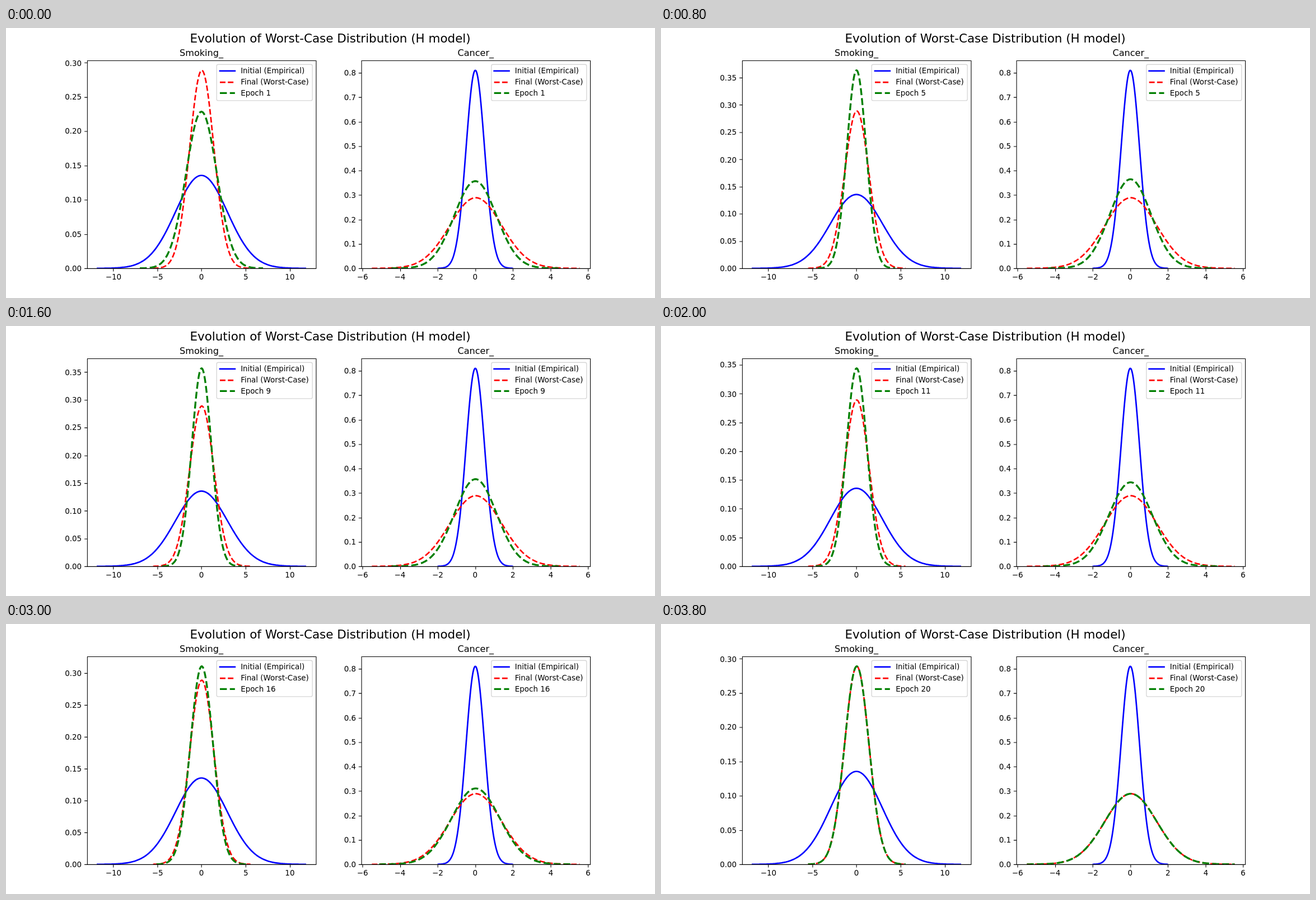
An HTML page for the animation above (4 s loop, 1159 by 483 pixels).

```html
<!DOCTYPE html>
<html lang="en">
<head>
<meta charset="utf-8">
<title>Evolution of Worst-Case Distribution</title>
<style>
  html, body { margin: 0; width: 100%; height: 100%; overflow: hidden; background: #fff; }
  svg { display: block; font-family: "DejaVu Sans", sans-serif; }
</style>
</head>
<body>
<svg id="stage" width="1159" height="483" viewBox="0 0 1200 500" preserveAspectRatio="none"></svg>
<script>
// Layout is done on a 1200 x 500 figure at 100 dpi.
const PT = 100 / 72, EM = 10 * PT;
const TOP = 60, BOTTOM = 445, WIDTH = 930 / 2.2;
const STEP_MS = 200, FINAL_PEAK = 0.2889;
const NORM = 1 / Math.sqrt(2 * Math.PI);

// Peak density for each epoch; the panels differ only in the first five.
const LEFT_START = [0.2285, 0.2977, 0.3388, 0.358, 0.3636];
const RIGHT_START = [0.3568, 0.339, 0.347, 0.3597, 0.3645];
const SHARED = [0.3662, 0.3652, 0.3618, 0.3569, 0.3506, 0.344, 0.337, 0.33,
  0.3231, 0.3168, 0.3108, 0.305, 0.2996, 0.2943, FINAL_PEAK];
const EPOCHS = LEFT_START.length + SHARED.length;

const panels = [
  { title: "Smoking_", left: 150, initial: 0.1355, finalMean: 0.04,
    xTicks: [-10, -5, 0, 5, 10], yStep: 0.05, digits: 2, peaks: [...LEFT_START, ...SHARED] },
  { title: "Cancer_", left: 1080 - WIDTH, initial: 0.8107, finalMean: 0.025,
    xTicks: [-6, -4, -2, 0, 2, 4, 6], yStep: 0.1, digits: 1, peaks: [...RIGHT_START, ...SHARED] },
];

// The widest curve spans four sigmas each way plus a 5 % margin on both sides.
for (const panel of panels) {
  const widest = Math.min(panel.initial, FINAL_PEAK);
  const center = widest === FINAL_PEAK ? panel.finalMean : 0;
  const scale = WIDTH / (8.8 * NORM / widest);
  panel.x = value => panel.left + WIDTH / 2 + (value - center) * scale;
}

const styles = {
  initial: { color: "#0000ff", width: 2 * PT },
  final: { color: "#ff0000", width: 2 * PT, dashed: true },
  epoch: { color: "#008000", width: 2.5 * PT, dashed: true },
};

const snap = v => Math.round(v) + 0.5;
const ruler = document.createElement("canvas").getContext("2d");

// align: 0 = start, 0.5 = middle, 1 = end; text begins on a whole figure pixel.
function text(x, y, size, align, content) {
  ruler.font = `${size}px "DejaVu Sans", sans-serif`;
  const start = Math.round(x - align * ruler.measureText(content).width);
  return `<text x="${start}" y="${Math.round(y)}" font-size="${size}">${content}</text>`;
}

function stroke(d, { color, width, dashed }) {
  const dash = dashed ? `stroke-dasharray="${3.7 * width} ${1.6 * width}"` : 'stroke-linecap="square"';
  return `<path d="${d}" fill="none" stroke="${color}" stroke-width="${width}" stroke-linejoin="round" ${dash}/>`;
}

const yAt = (value, yMax) => BOTTOM - value / yMax * (BOTTOM - TOP);

function bell(panel, yMax, peak, mean) {
  const sigma = NORM / peak, count = 200;
  const points = Array.from({ length: count }, (_, i) => {
    const z = -4 + 8 * i / (count - 1);
    const y = yAt(peak * Math.exp(-z * z / 2), yMax);
    return panel.x(mean + z * sigma).toFixed(2) + "," + y.toFixed(2);
  });
  return "M" + points.join("L");
}

function axes(panel, yMax) {
  const x0 = snap(panel.left), x1 = snap(panel.left + WIDTH);
  const y0 = snap(TOP), y1 = snap(BOTTOM);
  let lines = `M${x0},${y0}H${x1}V${y1}H${x0}Z`, labels = "";
  for (const value of panel.xTicks) {
    const x = panel.x(value);
    lines += `M${snap(x)},${y1}v${3.5 * PT}`;
    labels += text(x, 466, EM, 0.5, String(value).replace("-", "\u2212"));
  }
  for (let i = 0; i * panel.yStep <= yMax; i++) {
    const value = i * panel.yStep, y = yAt(value, yMax);
    lines += `M${x0},${snap(y)}h${-3.5 * PT}`;
    labels += text(panel.left - 7 * PT, y + 5.3, EM, 1, value.toFixed(panel.digits));
  }
  return stroke(lines, { color: "#000", width: 0.8 * PT }) + labels +
    text(panel.left + WIDTH / 2, TOP - 6 * PT, 12 * PT, 0.5, panel.title);
}

function legend(panel, epoch) {
  const right = panel.left + WIDTH - EM / 2, left = right - 176.3;
  const start = left + 0.4 * EM;
  const rows = [
    ["Initial (Empirical)", styles.initial, 79.5],
    ["Final (Worst-Case)", styles.final, 100.5],
    ["Epoch " + epoch, styles.epoch, 120.5],
  ];
  return `<rect x="${snap(left)}" y="67.5" width="${snap(right) - snap(left)}" height="67" rx="2.8"
    fill="#fff" fill-opacity=".8" stroke="#ccc" stroke-opacity=".8" stroke-width="${PT}"/>` +
    rows.map(([label, style, y]) =>
      stroke(`M${snap(start)},${y}h${2 * EM}`, style) +
      text(start + 2.8 * EM, y + 4.5, EM, 0, label)).join("");
}

function drawPanel(panel, index, epoch) {
  const peak = panel.peaks[epoch - 1];
  const yMax = 1.05 * Math.max(panel.initial, FINAL_PEAK, peak);
  const curves = [
    [panel.initial, 0, styles.initial],
    [FINAL_PEAK, panel.finalMean, styles.final],
    [peak, panel.finalMean * epoch / EPOCHS, styles.epoch],
  ];
  return `<clipPath id="clip${index}"><rect x="${panel.left}" y="${TOP}" width="${WIDTH}"
    height="${BOTTOM - TOP}"/></clipPath><g clip-path="url(#clip${index})">` +
    curves.map(([p, mean, style]) => stroke(bell(panel, yMax, p, mean), style)).join("") +
    "</g>" + axes(panel, yMax) + legend(panel, epoch);
}

const stage = document.getElementById("stage");
const startTime = performance.now();
let shown = 0;

function tick() {
  const elapsed = Math.max(0, performance.now() - startTime);
  const epoch = Math.floor(elapsed / STEP_MS) % EPOCHS + 1;
  if (epoch !== shown) {
    shown = epoch;
    stage.innerHTML =
      text(600, 27, 16 * PT, 0.5, "Evolution of Worst-Case Distribution (H model)") +
      panels.map((panel, i) => drawPanel(panel, i, epoch)).join("");
  }
  requestAnimationFrame(tick);
}
tick();
</script>
</body>
</html>
```
